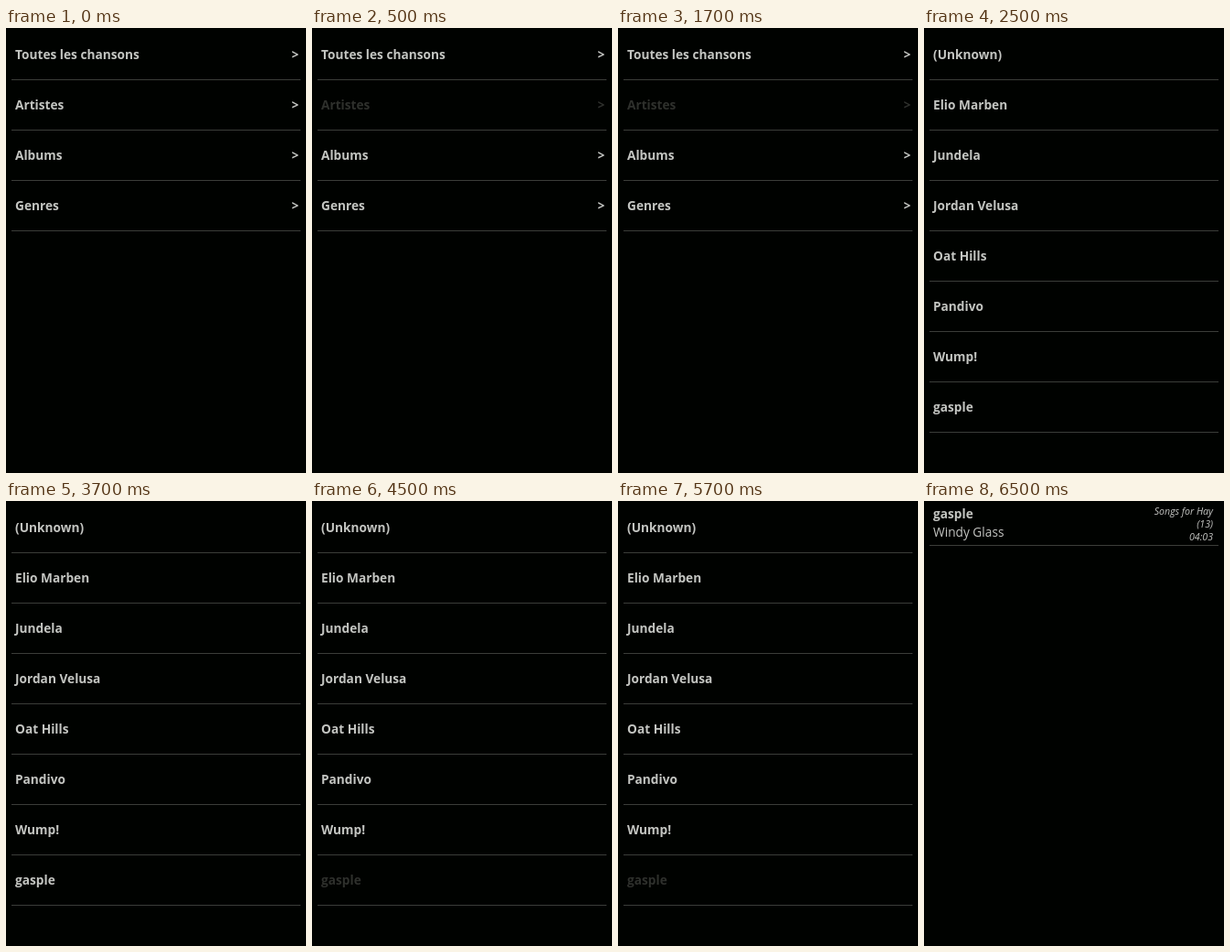
Recreate the animation shown at these times as an HTML page. Size 328 by 486 pixels, loop 8 s.

```html
<!DOCTYPE html>
<html lang="fr">
<head>
<meta charset="utf-8">
<style>
  html, body { margin: 0; width: 100%; height: 100%; overflow: hidden; background: #000200; }
  svg { display: block; font: 13.7px "Open Sans", "Noto Sans", sans-serif; fill: #c3c5c1; }
  .bold { font-weight: 700; }
  .small { font-size: 10.6px; font-style: italic; }
  .dim { fill: #2e302c; }
  .end { text-anchor: end; }
  rect { fill: #3b3d39; }
</style>
</head>
<body>
<svg id="stage" width="328" height="486"></svg>
<script>
const LOOP = 8000, ROW = 55;
const menu = ["Toutes les chansons", "Artistes", "Albums", "Genres"];
const artists = ["(Unknown)", "Elio Marben", "Jundela", "Jordan Velusa",
  "Oat Hills", "Pandivo", "Wump!", "gasple"];

const text = (x, y, cls, s) => `<text x="${x}" y="${y}" class="${cls}">${s}</text>`;
const rule = y => `<rect x="6" y="${y}" width="316" height="1"/>`;

function list(items, pressed, arrows) {
  return items.map((item, i) => {
    const y = 34 + i * ROW;
    const cls = i === pressed ? "bold dim" : "bold";
    return text(10, y, cls, item) +
      (arrows ? text(320, y, cls + " end", "&gt;") : "") +
      rule(56 + i * ROW);
  }).join("");
}

function song() {
  const details = ["Songs for Hay", "(13)", "04:03"];
  return text(10, 19, "bold", artists[7]) + text(10, 39, "", "Windy Glass") +
    details.map((s, i) => text(316, 15 + i * 14, "small end", s)).join("") +
    rule(48);
}

const scenes = [
  [0, list(menu, -1, true)],
  [500, list(menu, 1, true)],
  [2500, list(artists, -1)],
  [4500, list(artists, 7)],
  [6500, song()]
];

const stage = document.getElementById("stage");
let shown;
function draw(now) {
  const t = now % LOOP;
  const scene = scenes.findLast(([start]) => t >= start);
  if (scene !== shown) {
    shown = scene;
    stage.innerHTML = scene[1];
  }
}

const begin = performance.now();
function tick() {
  draw(performance.now() - begin);
  requestAnimationFrame(tick);
}
tick();
</script>
</body>
</html>
```
